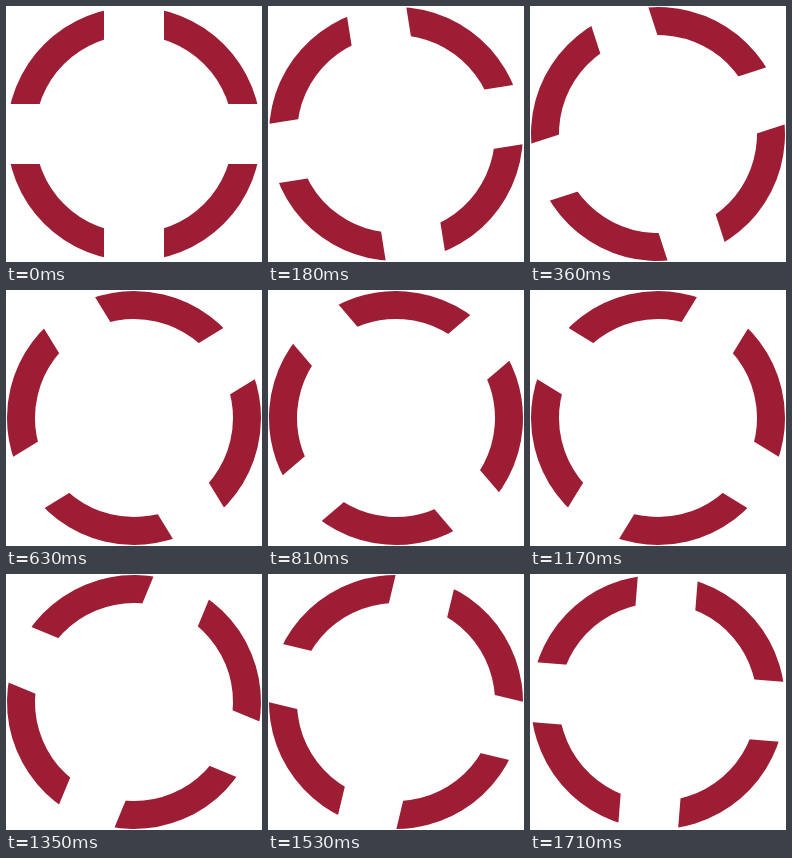
Recreate the animation shown at these times as an HTML page. Size 256 px wide and 256 px high, loop 1800 ms.

```html
<!DOCTYPE html>
<html lang="en">
<head>
<meta charset="utf-8">
<title>Spinner</title>
<style>
  html, body { margin: 0; width: 100%; height: 100%; overflow: hidden; background: #fff; }
  svg { display: block; width: 100vw; height: 100vh; filter: blur(.5px); }
</style>
</head>
<body>
<svg viewBox="-128 -128 256 256">
  <g id="ring">
    <circle r="113" fill="none" stroke="#9d1e34" stroke-width="28"/>
    <path d="M-128 0H128M0-128V128" stroke="#fff" stroke-width="60"/>
  </g>
</svg>
<script>
  const LOOP = 1800, STEP = 90;
  const ring = document.getElementById('ring');
  const start = performance.now();

  // A quarter turn counterclockwise per loop, advancing in discrete steps.
  function draw() {
    const time = (performance.now() - start) % LOOP;
    const angle = -90 * Math.floor(time / STEP) * STEP / LOOP;
    ring.setAttribute('transform', `rotate(${angle})`);
    requestAnimationFrame(draw);
  }
  draw();
</script>
</body>
</html>
```
